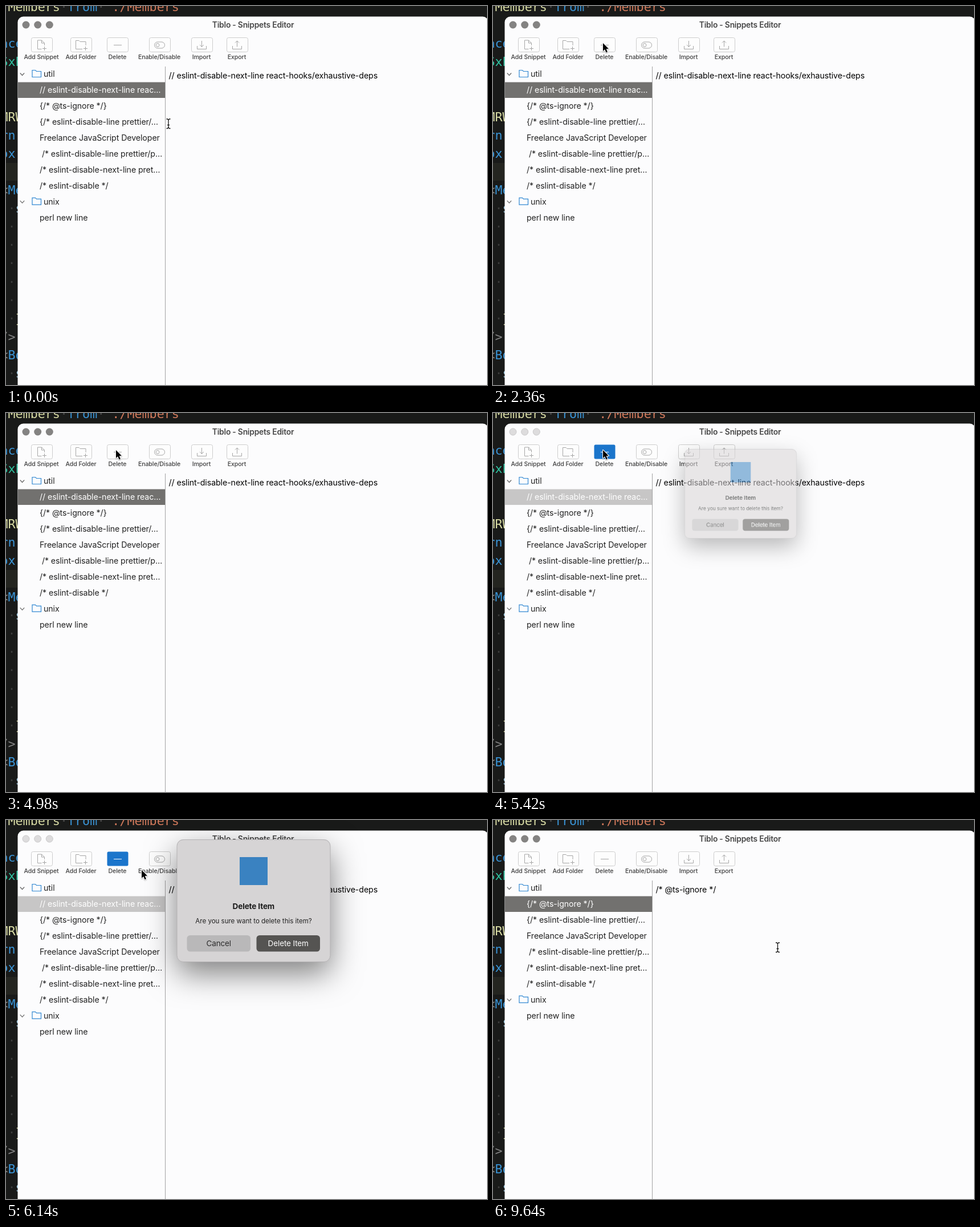
An HTML page with a canvas that plays this animation: 844x664 px, repeating every 9.66 s.

```html
<!DOCTYPE html>
<html lang="en">
<head>
<meta charset="utf-8">
<title>Snippets Editor</title>
<style>
html, body { margin: 0; width: 100%; height: 100%; overflow: hidden; background: #191a19; }
canvas { display: block; }
</style>
</head>
<body>
<canvas id="stage" width="844" height="664"></canvas>
<script>
const W = 844, H = 664, LOOP = 9660;
const PRESS = 5320, SHEET_IN = 5380, SHEET_OUT = 8960, DONE = 9150;
const SANS = 'Inter, "Open Sans", sans-serif';
const MONO = '"DejaVu Sans Mono", monospace';
const BLUE = '#3a94d6', CREAM = '#d8dba4', GREY = '#858585';

const stage = document.getElementById('stage').getContext('2d');
const sheet = document.createElement('canvas');
sheet.width = W;
sheet.height = H;
let c = stage;

const clamp = v => Math.max(0, Math.min(1, v));
const smooth = v => v * v * (3 - 2 * v);

function text(str, x, y, color, size = 14.2, weight = 400, align = 'left', spacing = -0.085) {
  c.font = `${weight} ${size}px ${SANS}`;
  c.letterSpacing = spacing + 'px';
  c.textAlign = align;
  c.fillStyle = color;
  c.fillText(str, x, y);
}

function box(x, y, w, h, r, fill, stroke) {
  c.beginPath();
  c.roundRect(x, y, w, h, r);
  if (fill) { c.fillStyle = fill; c.fill(); }
  if (stroke) { c.strokeStyle = stroke; c.lineWidth = 1; c.stroke(); }
}

function line(points, color, width = 1, closed = false) {
  c.beginPath();
  points.forEach(([x, y]) => c.lineTo(x, y));
  if (closed) c.closePath();
  c.strokeStyle = color;
  c.lineWidth = width;
  c.stroke();
}

// Code editor behind the window, on a grid of character cells
function code(str, col, row, color) {
  c.font = `21.7px ${MONO}`;
  c.letterSpacing = '0px';
  c.textAlign = 'left';
  c.fillStyle = color;
  c.fillText(str, 3.5 + col * 13.06, 9 + row * 32.1);
}

function drawCode() {
  c.fillStyle = '#191a19';
  c.fillRect(0, 0, W, H);
  c.fillStyle = '#242520';
  c.fillRect(0, 275, 21, 31);

  code('Members', 0, 0, CREAM);
  code('from', 8, 0, BLUE);
  code("'./Members", 13, 0, '#d27a5c');
  for (const col of [7, 12]) code('·', col, 0, '#454545');

  code('ace', -1, 2, BLUE);
  code('SxP', -1, 3, '#2fc3a0');
  code('MRW', -1, 6, CREAM);
  code('rn', -1, 7, BLUE);
  code('ox', -1, 8, BLUE);
  code('<', -1, 10, GREY);
  code('Me', 0, 10, BLUE);
  code('s', 1, 11, '#9cc8e0');
  code('}', 1, 17, CREAM);
  code('/>', -1, 18, GREY);
  code('<', -1, 19, GREY);
  code('Bo', 0, 19, BLUE);
  code('s', 1, 20, '#9cc8e0');
  for (const row of [11, 12, 13, 14, 15, 16, 17, 20]) code('·', 0, row, '#3c3c3c');
}

// Toolbar
const ICON = '#a6a6a6';
function plus(x, y) {
  line([[x - 3.5, y], [x + 3.5, y]], ICON);
  line([[x, y - 3.5], [x, y + 3.5]], ICON);
}
function tray(x, up) {
  line([[x - 8, 70], [x - 8, 75.5], [x + 8, 75.5], [x + 8, 70]], ICON);
  line([[x, 61], [x, 71.5]], ICON);
  const tip = up ? 61 : 71.5, tail = up ? 64.5 : 68;
  line([[x - 3.5, tail], [x, tip], [x + 3.5, tail]], ICON);
}

const tools = [
  ['Add Snippet', 62.5, x => {
    line([[x, 75.5], [x - 7, 75.5], [x - 7, 60], [x, 60], [x + 5, 65], [x + 5, 69]], ICON);
    line([[x, 60], [x, 65], [x + 5, 65]], ICON);
    plus(x + 5, 74.5);
  }],
  ['Add Folder', 132, x => {
    line([[x + 2, 75.5], [x - 9.5, 75.5], [x - 9.5, 60.5], [x - 4, 60.5], [x - 2, 62.5], [x + 8, 62.5], [x + 8, 69]], ICON);
    plus(x + 7.5, 74.5);
  }],
  ['Delete', 196, (x, pressed) => line([[x - 7, 68.5], [x + 7, 68.5]], pressed ? '#fff' : ICON)],
  ['Enable/Disable', 269.5, x => {
    box(x - 9, 63, 18, 11, 5.5, null, ICON);
    c.beginPath();
    c.arc(x - 3.5, 68.5, 3, 0, 7);
    c.stroke();
  }],
  ['Import', 343.5, x => tray(x, false)],
  ['Export', 405.5, x => tray(x, true)]
];

function drawToolbar(modal) {
  for (const x of [35, 55.7, 76.3]) {
    c.beginPath();
    c.arc(x, 33, modal ? 6 : 6.5, 0, 7);
    c.fillStyle = modal ? '#dddcdd' : '#848382';
    c.fill();
    if (modal) { c.strokeStyle = '#cac9ca'; c.lineWidth = 1; c.stroke(); }
  }
  text('Tiblo - Snippets Editor', 433.5, 37.5, '#474747', 13.8, 600, 'center', -0.2);
  for (const [label, x, icon] of tools) {
    const pressed = modal && label === 'Delete';
    const left = Math.round(x - 19) + 0.5;
    if (pressed) box(left, 55.5, 37, 25, 2.5, '#1b75cb');
    else box(left, 55.5, 37, 25, 3, '#fdfdfd', '#cdcdcd');
    icon(x, pressed);
    text(label, x - 0.5, 93, '#414141', 10.6, 500, 'center', -0.1);
  }
}

// Snippet list
const items = [
  '// eslint-disable-next-line reac…', '{/* @ts-ignore */}',
  '{/* eslint-disable-line prettier/…', 'Freelance JavaScript Developer',
  ' /* eslint-disable-line prettier/p…', '/* eslint-disable-next-line pret…',
  '/* eslint-disable */'
];

function folder(name, y) {
  line([[24.8, y - 1.5], [28.5, y + 2.5], [32.2, y - 1.5]], '#6a6a6a', 1.3);
  line([[46, y + 5.5], [46, y - 6.5], [51.5, y - 6.5], [53.5, y - 4.5], [61.5, y - 4.5], [61.5, y + 5.5]], '#2f87d2', 1.2, true);
  text(name, 66, y + 5, '#222');
}

function drawList(modal, removed) {
  const rows = removed ? items.slice(1) : items;
  const rowY = i => 119 + i * 27.95;
  c.fillStyle = modal ? '#c7c6c6' : '#72716f';
  c.fillRect(21, 133.5, 258, 27.5);
  folder('util', rowY(0));
  rows.forEach((s, i) => text(s, 59, rowY(i + 1) + 5, i ? '#222' : '#fff'));
  folder('unix', rowY(rows.length + 1));
  text('perl new line', 59, rowY(rows.length + 2) + 5, '#222');

  c.fillStyle = '#a3a2a3';
  c.fillRect(279, 106, 1, H - 106);
  const body = removed ? '/* @ts-ignore */' : '// eslint-disable-next-line react-hooks/exhaustive-deps';
  text(body, 285.5, 127, '#000');
}

// Confirmation sheet, drawn once and then scaled and faded as a group
function buildSheet() {
  c = sheet.getContext('2d');
  c.clearRect(0, 0, W, H);
  c.save();
  c.shadowColor = 'rgba(0,0,0,.5)';
  c.shadowBlur = 54;
  c.shadowOffsetY = 20;
  box(300, 34, 269, 214.5, 11, '#d6d4d6');
  c.restore();
  box(300, 34.5, 269, 214, 11, '#d6d4d5', '#b3b1b3');
  c.fillStyle = '#3a82c1';
  c.fillRect(410, 65, 49, 49);
  text('Delete Item', 434.3, 156, '#1c1c1c', 13.6, 700, 'center', -0.15);
  text('Are you sure want to delete this item?', 434.5, 181, '#222', 11.6, 400, 'center', -0.04);
  box(317.5, 202, 111.5, 28.5, 5.5, '#b9b8b9');
  box(439.5, 202, 111.5, 28.5, 5.5, '#555452');
  text('Cancel', 373.2, 220.5, '#2b2b2b', 13.5, 400, 'center', -0.12);
  text('Delete Item', 495.2, 220.5, '#fff', 13.5, 400, 'center', -0.12);
  c = stage;
}

function drawSheet(t) {
  if (t < SHEET_IN || t >= DONE) return;
  const u = clamp((t - SHEET_IN) / 240);
  const p = 1 - (1 - u) * (1 - u);
  const scale = 0.605 + 0.395 * p;
  c.save();
  c.globalAlpha = clamp(p * 1.75) * (1 - clamp((t - SHEET_OUT) / (DONE - SHEET_OUT)));
  c.translate(434.5, 141.5);
  c.scale(scale, scale);
  c.drawImage(sheet, -434.5, -141.5);
  c.restore();
}

// Pointer: time, x, y
const path = [
  [0, 285, 206], [300, 285, 206], [950, 251, 107], [1250, 251, 107], [1950, 193, 65],
  [5940, 193, 65], [6780, 505, 223], [9200, 505, 223], [9500, 499.5, 223], [LOOP, 499.5, 223]
];

function pointerAt(t) {
  const i = path.findIndex(k => k[0] > t);
  const [t0, x0, y0] = path[i - 1], [t1, x1, y1] = path[i];
  const p = smooth((t - t0) / (t1 - t0));
  return [x0 + (x1 - x0) * p, y0 + (y1 - y0) * p];
}

function drawPointer(t, modal) {
  const [x, y] = pointerAt(t);
  c.save();
  c.translate(x, y);
  c.lineJoin = 'round';
  if (!modal && x > 280 && y > 106) {
    for (const [color, width] of [['rgba(255,255,255,.8)', 3], ['#111', 1.3]]) {
      line([[-3.5, -8], [-1.5, -8], [0, -6.5], [1.5, -8], [3.5, -8]], color, width);
      line([[-3.5, 8.5], [-1.5, 8.5], [0, 7], [1.5, 8.5], [3.5, 8.5]], color, width);
      line([[0, -6.5], [0, 7]], color, width);
      line([[-2, 2.5], [2, 2.5]], color, width);
    }
  } else {
    c.shadowColor = 'rgba(0,0,0,.3)';
    c.shadowBlur = 2;
    c.shadowOffsetY = 1;
    line([[0, 0], [0, 14], [3.2, 11.1], [5.5, 16.4], [7.9, 15.4], [5.7, 10.2], [10, 10]], '#fff', 2, true);
    c.shadowColor = 'transparent';
    c.fillStyle = '#000';
    c.fill();
  }
  c.restore();
}

function draw(t) {
  const modal = t >= PRESS && t < DONE;
  drawCode();
  box(20.5, 18.5, 826, 700, 10, '#fcfcfd');
  drawToolbar(modal);
  drawList(modal, t >= DONE);
  drawSheet(t);
  drawPointer(t, modal);
}

buildSheet();
const start = performance.now();
function frame() {
  draw((performance.now() - start) % LOOP);
  requestAnimationFrame(frame);
}
frame();
</script>
</body>
</html>
```
